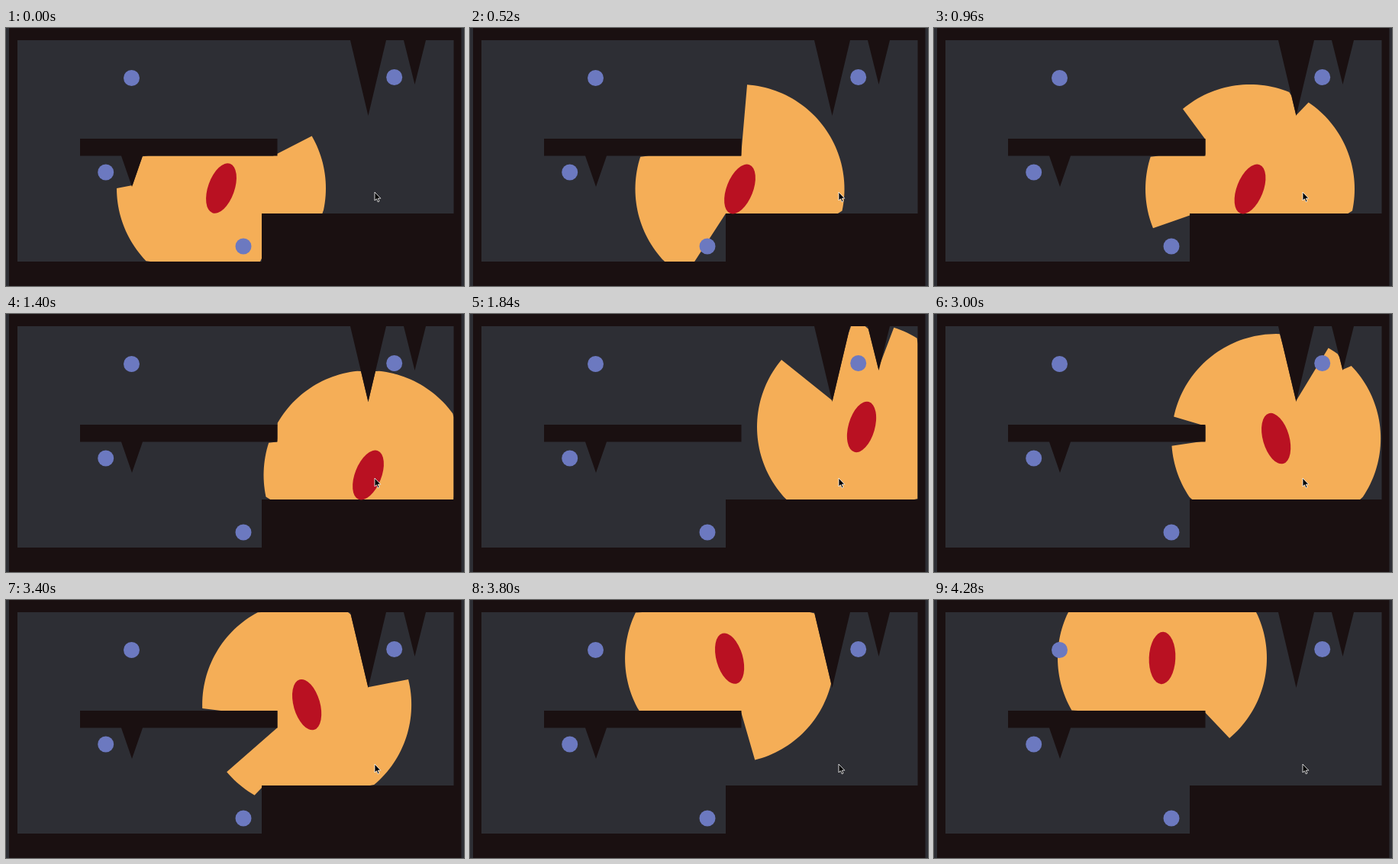
Write an HTML page that moves like this. It is 600 by 338 pixels and loops after 4.32 s.

```html
<!DOCTYPE html>
<html lang="en">
<head>
<meta charset="utf-8">
<title>Light and shadow</title>
<style>
  html, body { margin: 0; width: 100%; height: 100%; overflow: hidden; background: #2d2e34; }
  svg { display: block; width: 100vw; height: 100vh; }
  .air { fill: #2d2e34; }
  .wall { fill: #1a1011; }
  .orb { fill: #6c79c0; }
</style>
</head>
<body>
<svg viewBox="0 0 600 338">
  <rect class="air" width="600" height="338"/>
  <polygon id="light" fill="#f5ae57"/>
  <path id="walls" class="wall" fill-rule="evenodd"/>
  <g id="orbs" class="orb"></g>
  <ellipse id="player" rx="17.3" ry="34.2" fill="#b91122"/>
  <path transform="translate(483 215)" fill="#000" stroke="#fff" stroke-width=".8"
        d="M0 0V11L2.5 8.8L4.2 12.8L6 12L4.3 8.2H7.8Z"/>
</svg>
<script>
const NS = 'http://www.w3.org/2000/svg';
const STEP = 40, STEPS = 108;
const RADIUS = 137, RAYS = 180;
const GROUND = 211, RISE = 72.5, HALF_GRAVITY = 0.2725;
const byId = id => document.getElementById(id);

const box = (x1, y1, x2, y2) => [[x1, y1], [x2, y1], [x2, y2], [x1, y2]];
const spike = (left, right, top, tip) => [[left, top], [right, top], [(left + right) / 2, tip]];

const room = [[15, 16], [586.5, 16], [586.5, 243], [335, 243], [335, 306], [15, 306]];
const obstacles = [
  room,
  box(97, 145, 355.5, 167.5),
  spike(151, 179, 167.5, 208),
  spike(451, 498, 16, 115),
  spike(521, 550, 16, 74),
];
const edges = obstacles.flatMap(shape => shape.map((p, i) => [p, shape[(i + 1) % shape.length]]));

const toPath = shape => `M${shape.join('L')}Z`;
byId('walls').setAttribute('d', [box(4, 0, 596.5, 338), ...obstacles].map(toPath).join(''));

for (const [cx, cy] of [[164.5, 65.5], [508.7, 64.5], [130.7, 189], [311, 286]]) {
  const orb = byId('orbs').appendChild(document.createElementNS(NS, 'circle'));
  orb.setAttribute('cx', cx);
  orb.setAttribute('cy', cy);
  orb.setAttribute('r', 10.5);
}

// Distance from (x, y) along (dx, dy) to an edge, or Infinity when missed.
function hit(x, y, dx, dy, [[ax, ay], [bx, by]]) {
  const ex = bx - ax, ey = by - ay, cross = dx * ey - dy * ex;
  const far = ((ax - x) * ey - (ay - y) * ex) / cross;
  const along = ((ax - x) * dy - (ay - y) * dx) / cross;
  return far > 0 && along >= 0 && along <= 1 ? far : Infinity;
}

// The lit area joins the ends of evenly spaced rays.
function litArea(x, y) {
  return Array.from({ length: RAYS }, (_, i) => {
    const angle = i / RAYS * 2 * Math.PI;
    const dx = Math.cos(angle), dy = Math.sin(angle);
    const reach = Math.min(RADIUS, ...edges.map(edge => hit(x, y, dx, dy, edge)));
    return [x + dx * reach, y + dy * reach];
  });
}

const ramp = (n, from, to) => Math.min(1, Math.max(0, (n - from) / (to - from)));

// Run right, wait under the spikes, run back left.
const xAt = n => 282 + 231 * ramp(n, 0, 42) - 214 * ramp(n, 63, 102.6);

// Equal jumps, each peaking at a step and starting from a height.
const jump = (n, peak, from) => from - RISE + HALF_GRAVITY * (n - peak) ** 2;
const yAt = n => Math.min(GROUND,
  jump(n, 5.9, 273), jump(n, 51.9, GROUND), jump(n, 84.5, GROUND), jump(n, 101.1, 139));

// Lean into the run, a little more on the ground than in the air.
function tiltAt(n) {
  const heading = 1 - 2 * ramp(n, 63, 69) + 2 * ramp(n, 103, 110);
  return heading * (16 + 5.6 * ramp(yAt(n), GROUND - 3, GROUND));
}

function draw(time) {
  const n = Math.floor(time / STEP) % STEPS;
  const x = xAt(n), y = yAt(n);
  byId('light').setAttribute('points', litArea(x, y).join(' '));
  byId('player').setAttribute('transform', `translate(${x} ${y}) rotate(${tiltAt(n)})`);
}

const start = performance.now();
function tick() {
  draw(performance.now() - start);
  requestAnimationFrame(tick);
}
tick();
</script>
</body>
</html>
```
